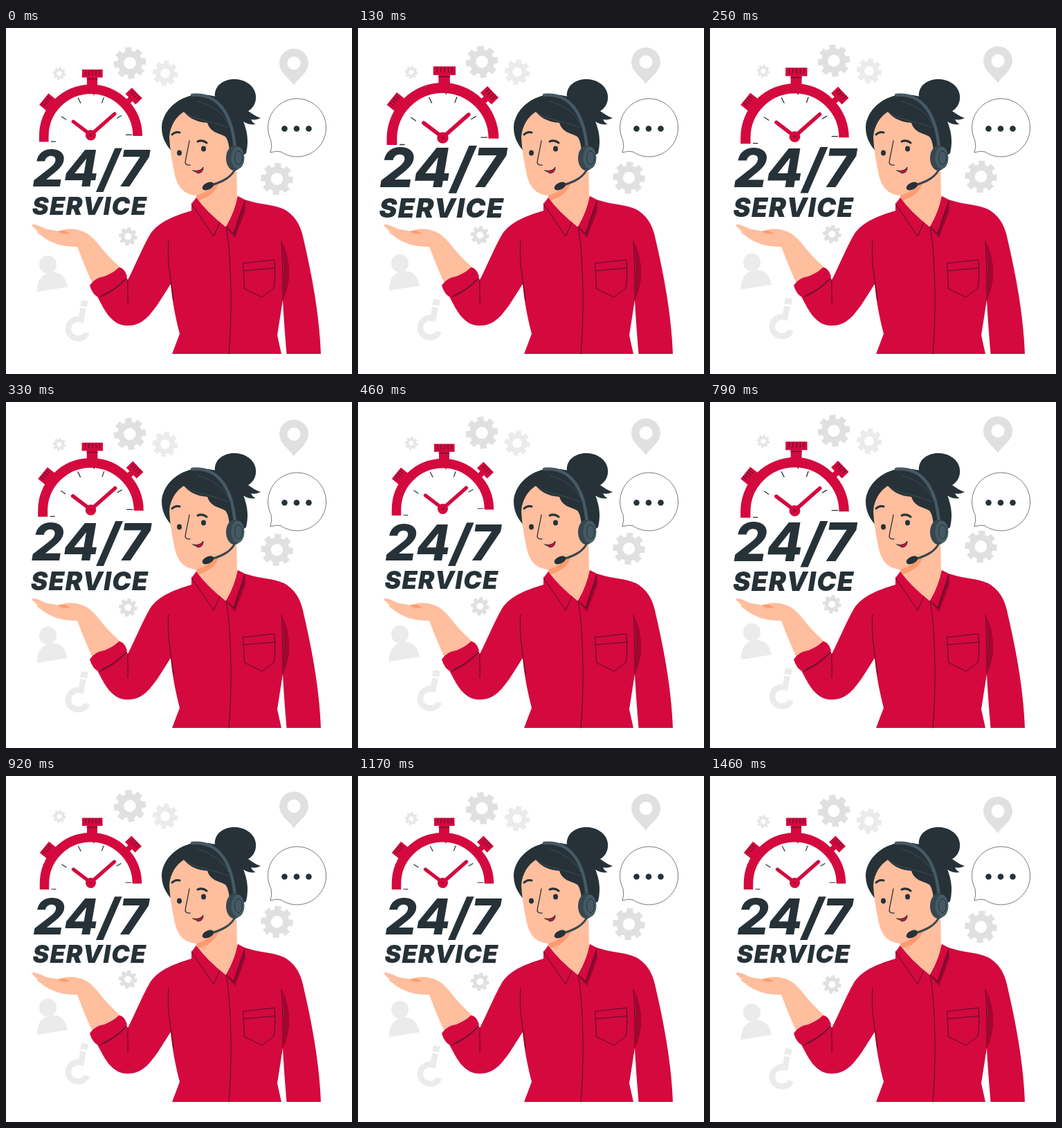
Write an HTML page that moves like this. It is 500 px wide and 500 px high and loops after 1500 ms.

```html
<!DOCTYPE html>
<html lang="en">
<head>
<meta charset="utf-8">
<title>24/7 service</title>
<style>
  html, body { margin: 0; width: 100%; height: 100%; overflow: hidden; background: #fff; }
  svg { display: block; width: 100%; height: 100%; }
  text { font-family: Inter, "Open Sans", sans-serif; font-weight: 800; font-style: italic; text-anchor: middle; }
  .red { fill: #d4093e; }
  .dark { fill: #263238; }
  .skin { fill: #ffbe9d; }
  .line { fill: none; stroke: #263238; stroke-linecap: round; stroke-linejoin: round; }
  .crease { fill: none; stroke: #3d1525; stroke-width: .9; stroke-linecap: round; stroke-linejoin: round; }
</style>
</head>
<body>
<svg viewBox="0 0 500 500">
  <g id="floating" fill="#e0e0e0" fill-rule="evenodd">
    <g id="gears"></g>
    <path d="M416 83.300C411 74 395 65 395 51A21 21 0 0 1 437 51C437 65 421 74 416 83.300ZM416 41.500a9.500 9.500 0 1 0 .01 0Z"/>
    <g fill="#ebebeb">
      <ellipse cx="60.500" cy="342" rx="12.500" ry="13"/>
      <path d="M44.500 381.500C45 364 52 355 65 353.500C78 352 86 359 89 374.500Z"/>
      <path d="M109 393.500l10 1.500-2 8.500-10-1.500Z"/>
    </g>
    <path d="M111.500 405.500L108.500 421.500C98 419 90 426 90 435C90 451 113 453.500 117 440.500" fill="none" stroke="#ebebeb" stroke-width="8.500"/>
  </g>

  <g id="clock">
    <path d="M63 164V156A60 60 0 0 1 183 155Z" fill="#fff"/>
    <path d="M117 71h15v12h-15z" class="red"/>
    <path d="M110 60.500h29.500v11.500h-29.500z" class="red"/>
    <path d="M115 62v6M120 62v6M125 62v6M130 62v6M135 62v6M117 74h15" class="crease"/>
    <g id="knobs"></g>
    <path d="M55.500 164V156A67 67 0 0 1 189.500 155.500" fill="none" stroke="#d4093e" stroke-width="13.500"/>
    <path d="M66 163.500h6M173 154h8M81 128l6 4M104.500 101.500l3.500 7M127 95v2M141 101l-2.500 7M160 130l6-3.500" class="line" stroke-width="1.200"/>
    <path d="M97.500 135L122.500 154L156.500 124" class="line" style="stroke:#d4093e" stroke-width="5.200"/>
    <circle cx="122.500" cy="154.500" r="7.500" class="red"/>
    <circle cx="122.500" cy="154.500" r="2" fill="#a80731"/>
  </g>

  <g id="label" class="dark">
    <text x="122" y="229.300" font-size="72">24/7</text>
    <text x="121" y="270" font-size="35.500" font-weight="900" letter-spacing="1.300" style="font-weight:900">SERVICE</text>
  </g>

  <g id="agent">
    <path class="skin" d="M37 284.500C43 282 53 289 60 291C67 292 73 293 78 294C86 289 98 290 105 292C118 295 127 304 134 313C144 326 155 337 166 347L126 371C117 352 109 332 103 316C90 316 78 315 66 309C57 306 51 299 44 295C50 295 40 290 37 284.500Z"/>
    <path d="M75 294C82 291 88 293 92 297C85 299 80 297 75 294Z" fill="#ff9b70"/>

    <path class="dark" d="M302 100C300 84 314 73 332 74C350 75 363 88 361 103C360 112 354 118 350 120C356 124 361 128 368 130C362 133 357 133 354 132C356 136 358 138 361 139C351 141 342 136 338 130C323 132 305 121 302 100Z"/>
    <path class="dark" d="M239 178C229 166 225 156 225 143C226 124 242 103 270 97C306 92 335 110 342 132C347 145 352 160 347 181L334 190L318 182L250 145Z"/>

    <path class="skin" d="M276 237L273 252C279 268 294 285 317 289C328 278 335 260 334 244L333 190L300 190Z"/>
    <path class="skin" d="M257 121C266 132 278 136 291 137C296 152 307 151 317 157C321 162 322 169 323 177L326 207C317 220 297 239 276 242C255 241 246 227 243 207C239 188 237 175 236 158C237 141 246 128 257 121Z"/>
    <path d="M275 242C287 239 298 231 308 222C304 236 294 245 278 249Z" fill="#ff9b70"/>
    <path d="M257 121C270 133 298 134 321 144M277 106C296 111 313 122 322 139" fill="none" stroke="#455a64" stroke-width=".7"/>

    <ellipse class="dark" cx="250.500" cy="180.500" rx="3.500" ry="4"/>
    <ellipse class="dark" cx="285.500" cy="174.500" rx="3.500" ry="4"/>
    <path class="line" stroke-width="3" d="M240 154Q245 149 251 151M277 164Q284 161 290 166"/>
    <path class="line" stroke-width="1.300" d="M265 163C263 175 260 186 259 195Q261 199 266 198"/>
    <path class="line" stroke-width="1" style="fill:#d4093e" d="M270 206Q281 208 285 201Q285 210 277 210Q275 208 270 206Z"/>

    <path d="M269 97C302 94 326 117 331 174" fill="none" stroke="#455a64" stroke-width="4.500" stroke-linecap="round"/>
    <path d="M332 202C326 216 313 222 297 227" fill="none" stroke="#37474f" stroke-width="3"/>
    <ellipse cx="330" cy="188" rx="12" ry="18" fill="#37474f"/>
    <ellipse cx="335" cy="187.500" rx="9.500" ry="16" fill="#455a64"/>
    <ellipse cx="336" cy="187.500" rx="5.500" ry="10" fill="none" stroke="#263238"/>
    <ellipse class="dark" cx="292" cy="228.500" rx="9" ry="5" transform="rotate(-25 292 228.500)"/>

    <path class="red" d="M275 245Q290 266 318 288Q331 265 335 243L345 248C365 255 387 255 402 262C416 270 425 283 429 301C440 348 453 411 455 471H405.500C403 440 401 415 400 393L392 444L398 471H240L251 442C245 419 240 393 238 370C228 385 221 398 212 409C199 426 187 431 173 430C152 428 143 409 132 388L172 357L176 364C187 343 197 317 209 297C222 279 245 271 268 264L268 254Z"/>
    <path class="red" d="M121 372Q128 361 142 359Q155 354 163 346Q171 346 175 359Q158 380 135 390Q125 386 121 372Z"/>
    <path class="crease" d="M136 389Q158 380 175 361M139 386Q158 378 171 364M176 364C175 377 177 388 176 399M235 307C232 338 239 366 242 393M398 308C400 340 400 370 400 393"/>
    <path d="M399 309C407 325 410 342 409 363Q406 382 400 393C401 366 402 337 399 309Z" fill="#a00630"/>
    <path d="M345 249L346 263L331 303L320 291Z" fill="#950731"/>
    <path class="red" d="M335 243L345 249L329 297L318 287Q331 265 335 243Z"/>
    <path class="crease" d="M268 254L300 301L309 281M318 287L329 297L345 250M318 288C326 325 327 420 322 471M343 340L388 335Q390 357 387 376L370 389L345 377ZM343 351L388 347"/>
  </g>

  <path d="M383 162.800A42 42 0 1 1 397 178.800Q390 177 382 180Q385 172 383 162.800Z" fill="#fff" stroke="#263238" stroke-width=".65"/>
  <g class="dark">
    <circle cx="402.500" cy="145.500" r="4.300"/>
    <circle cx="420" cy="145.500" r="4.300"/>
    <circle cx="437.500" cy="145.500" r="4.300"/>
  </g>
</svg>
<script>
  const byId = id => document.getElementById(id);

  // Eight-toothed wheel with a round hole
  function gear(x, y, radius, turn, color) {
    const points = [];
    for (let i = 0; i < 8; i++) {
      for (const [offset, r] of [[-.26, .76], [-.2, 1], [.2, 1], [.26, .76]]) {
        const a = i * Math.PI / 4 + offset;
        points.push((radius * r * Math.cos(a)).toFixed(2) + " " + (radius * r * Math.sin(a)).toFixed(2));
      }
    }
    const h = radius * .37;
    return `<path transform="translate(${x} ${y}) rotate(${turn})" fill="${color}"
      d="M${points.join("L")}ZM${h} 0A${h} ${h} 0 1 0 ${-h} 0A${h} ${h} 0 1 0 ${h} 0Z"/>`;
  }

  const knob = (x, y, turn) => `<g transform="translate(${x} ${y}) rotate(${turn})">
    <path class="red" d="M-10.500-6.500h21v13h-21zM-4 5h8v6h-8z"/>
    <path class="crease" d="M-6-5v6M-2-5v6M2-5v6M6-5v6"/></g>`;

  byId("gears").innerHTML =
    gear(179, 50.8, 23.5, -6, "#e0e0e0") +
    gear(230, 65.7, 18.5, 8, "#ebebeb") +
    gear(77, 66, 9.5, 10, "#e6e6e6") +
    gear(391.5, 218.3, 23.5, 4, "#e0e0e0") +
    gear(176.3, 301.5, 13.5, 8, "#e0e0e0");
  byId("knobs").innerHTML = knob(60.5, 107, -51) + knob(184, 98.5, 46);

  const LOOP = 1500, LEAD = 15;
  const BEAT = [[0, 1], [.1, 1.1], [.3, 1], [.4, 1], [.5, 1.1], [.6, 1], [1, 1]];

  function beatScale(p) {
    const i = BEAT.findIndex(([at]) => at > p);
    const [t0, s0] = BEAT[i - 1], [t1, s1] = BEAT[i];
    return s0 + (s1 - s0) * (p - t0) / (t1 - t0);
  }

  function scaleAbout(id, x, y, s) {
    byId(id).setAttribute("transform", `translate(${x} ${y}) scale(${s}) translate(${-x} ${-y})`);
  }

  function draw() {
    const p = (performance.now() + LEAD) % LOOP / LOOP;
    const lift = 10 * (1 - Math.abs(2 * p - 1));
    const s = beatScale(p);
    byId("floating").setAttribute("transform", `translate(0 ${-lift})`);
    scaleAbout("clock", 123, 112, s);
    scaleAbout("label", 121.5, 224, s);
    requestAnimationFrame(draw);
  }
  draw();
</script>
</body>
</html>
```
